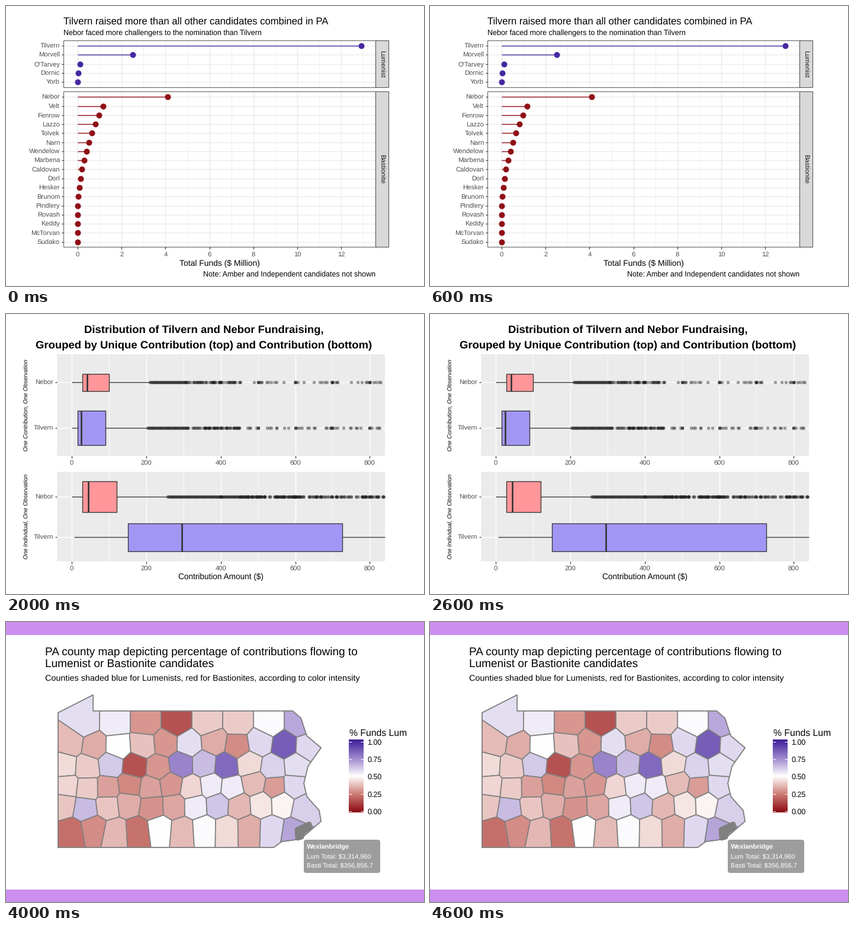
Animation of 706 by 472 pixels, one loop 5 s. Source, as a matplotlib script:

```python
from itertools import count

import matplotlib.pyplot as plt
import numpy as np
from matplotlib.animation import FuncAnimation
from matplotlib.colors import LinearSegmentedColormap
from matplotlib.patches import FancyBboxPatch, Polygon, Rectangle

W, H = 706, 472
PT = 0.72  # points per pixel at 100 dpi
plt.rcParams.update({"font.family": "Liberation Sans", "text.hinting": "none",
                     "text.parse_math": False, "toolbar": "None"})
fig = plt.figure(figsize=(W / 100, H / 100), dpi=100, facecolor="white")
rng = np.random.default_rng(7)
layer = count(1)
scenes = []
GREY, DARK, PANEL = "#4d4d4d", "#333333", "#ebebeb"

LEFT = ["Tilvern", "Morvell", "O'Tarvey", "Dornic", "Yorb"]
RIGHT = ["Nebor", "Velt", "Fenrow", "Lazzo", "Tolvek", "Narn", "Wendelow",
         "Marbena", "Caldovan", "Dorl", "Hesker", "Brunom", "Pindlery",
         "Rovash", "Keddy", "McTorvan", "Sudako"]
A, B = LEFT[0], RIGHT[0]


def scene():
    global ax
    ax = fig.add_axes([0, 0, 1, 1])
    ax.set_xlim(0, W)
    ax.set_ylim(H, 0)
    ax.axis("off")
    scenes.append(ax)


def text(x, y, s, size, color="black", ha="left", **kw):
    kw.setdefault("va", "baseline")
    ax.text(x, y, s, size=size * PT, color=color, ha=ha, zorder=next(layer), **kw)


def label(x, y, s, ha="right", size=11.2, color=GREY):
    text(x, y + 0.36 * size, s, size, color, ha)


def turned(x, y, s, size, color="black", angle=90, **kw):
    text(x, y, s, size, color, "center", va="center", rotation=angle, **kw)


def rect(x0, y0, x1, y1, fill, edge="none", lw=0):
    ax.add_patch(Rectangle((x0, y0), x1 - x0, y1 - y0, fc=fill, ec=edge,
                           lw=lw * PT, zorder=next(layer)))


def line(xs, ys, color, lw=1.4, **kw):
    kw.setdefault("solid_capstyle", "butt")
    ax.plot(xs, ys, color=color, lw=lw * PT, zorder=next(layer), **kw)


def hline(x0, x1, y, color, lw=1.4):
    line([x0, x1], [y, y], color, lw)


def vline(x, y0, y1, color, lw=1.4, **kw):
    line([x, x], [y0, y1], color, lw, **kw)


def dots(xs, ys, color, size, alpha=1):
    ax.plot(xs, ys, "o", color=color, ms=size * PT, mec="none", alpha=alpha,
            zorder=next(layer))


# Lollipop chart

def lollipops(names, values, top, bottom, first, color, strip):
    rect(97, top, 624, bottom, "white")
    for v in range(14):
        vline(121 + 37.1 * v, top, bottom, PANEL, 0.7 if v % 2 else 1.4)
    rows = [first + 15.27 * i for i in range(len(names))]
    for y in rows:
        hline(97, 624, y, PANEL)
    for name, v, y in zip(names, values, rows):
        x = 121 + 37.1 * v
        hline(121, x, y, color)
        dots([x], [y], color, 10)
        hline(93.5, 97, y, DARK, 1.2)
        label(91, y, name)
    rect(97, top, 624, bottom, "none", "#666666", 1.1)
    rect(624, top, 646, bottom, "#d9d9d9", "#555555", 1.1)
    turned(634.5, (top + bottom) / 2, strip, 11.3, "#1a1a1a", 270)


scene()
text(97, 31, f"{A} raised more than all other candidates combined in PA", 16.65)
text(97, 49, f"{B} faced more challengers to the nomination than {A}", 12.5)
lollipops(LEFT, [12.92, 2.5, 0.1, 0.02, 0.01], 58, 137, 67, "#4428a0", "Lumenist")
decay = 1.15 * np.clip(1 - np.arange(16) / 12, 0, 1) ** 2
lollipops(RIGHT, [4.1, *decay], 144, 406, 153.3, "#8f1016", "Bastionite")
for v in range(0, 14, 2):
    x = 121 + 37.1 * v
    vline(x, 406, 409.5, DARK, 1.2)
    label(x, 417.5, str(v), "center")
text(361, 438.5, "Total Funds ($ Million)", 13.95, ha="center")
text(624, 456.5, "Note: Amber and Independent candidates not shown", 12.5, ha="right")

# Waffle chart

SHARES = [(A, 52, "#74d9c9"), (B, 16, "#feffb3"), (LEFT[1], 10, "#c2b7dc"),
          (RIGHT[1], 5, "#ff7468"), (RIGHT[2], 3, "#72aed8"), (RIGHT[4], 3, "#ffb155"),
          (RIGHT[3], 3, "#9de560"), (RIGHT[5], 2, "#fec7e3"), (RIGHT[6], 2, "#d9d9d9"),
          (RIGHT[7], 1, "#cc6fbd"), (RIGHT[9], 1, "#c1efc8"), (RIGHT[8], 1, "#fff465"),
          ("12 Others Combined", 2, "#808080")]

scene()
text(48, 142, "Total Contributions to Candidates in PA", 22.15)
cells = [color for _, n, color in SHARES for _ in range(n)]
for i, color in enumerate(cells):
    x, y = 50.2 + 23.35 * (i // 4), 223 - 23.4 * (i % 4)
    rect(x, y, x + 18.2, y + 18.2, color)
text(351, 259.5, "1 square = $250,000", 12.2, "#111111", "center")
for i, (name, _, color) in enumerate(SHARES):
    x, y = (162, 228.5, 290, 354, 427)[i // 3], 294 + 21.4 * (i % 3)
    rect(x, y - 8, x + 16, y + 8, color)
    label(x + 21.3, y, name, "left", 10.7, "black")

# Box plots


def dollars(v):
    return 111 + 0.6292 * v


def panel(top, bottom, rows):
    rect(86, top, 640, bottom, PANEL)
    for v in range(0, 801, 100):
        vline(dollars(v), top, bottom, "white", 0.7 if v % 200 else 1.4)
    for v in range(0, 801, 200):
        vline(dollars(v), bottom, bottom + 3.5, DARK, 1.2)
        label(dollars(v), bottom + 11, str(v), "center")
    for y, name in zip(rows, (B, A)):
        hline(86, 640, y, "white")
        hline(82.5, 86, y, DARK, 1.2)
        label(80, y, name)


def box(y, half, lo, q1, mid, q3, hi, fill):
    hline(lo, hi, y, DARK, 1.3)
    rect(q1, y - half, q3, y + half, fill, DARK, 1.3)
    vline(mid, y - half, y + half, DARK, 2.6)


def outliers(y, start, dense, mid, n_mid, n_tail):
    """Solid run, thinning middle, sparse tail with clumps at round amounts."""
    clumps = np.r_[np.arange(400, 801, 50), np.tile(np.arange(400, 801, 100), 2)]
    xs = np.r_[np.arange(start, dense, 1.3), rng.uniform(dense, mid, n_mid),
               rng.uniform(mid, 638, n_tail), dollars(clumps)]
    dots(xs, np.full(len(xs), y), "#222222", 5.6, 0.42)


RED, BLUE = "#ff9699", "#a296f5"
scene()
text(334.5, 31.5, f"Distribution of {A} and {B} Fundraising,", 18.5, ha="center",
     weight="bold")
text(334.5, 57, "Grouped by Unique Contribution (top) and Contribution (bottom)", 18.5,
     ha="center", weight="bold")
panel(68, 239, (115, 192))
panel(266, 417, (307.5, 376))
box(115, 14.5, 111, 128.5, 136.5, 174, 243, RED)
box(192, 29, 111, 120.5, 127, 168, 239, BLUE)
box(307.5, 26, 111, 128.5, 139, 187, 273, RED)
box(376, 23.5, 115, 205.5, 297, 567.5, 640, BLUE)
outliers(115, 243, 303, 396, 56, 30)
outliers(192, 239, 304, 396, 60, 32)
outliers(307.5, 273, 394, 508, 110, 75)
turned(34, 154, "One Contribution, One Observation", 9.85, style="italic")
turned(34, 341.5, "One Individual, One Observation", 9.85, style="italic")
text(363, 447.5, "Contribution Amount ($)", 13.6, ha="center")

# Cumulative lines


def funds(v):
    return 402.5 - 25.63 * v


def grow(color, x0, x1, f, name="", dx=0, dy=0):
    """Rising line in small uneven steps, with an end dot if it is named."""
    xs = np.r_[np.arange(x0, x1, 2), x1]
    ys = funds(f(xs) + rng.normal(0, 0.015, len(xs)))
    ys[0], ys[-1] = funds(f(x0)), funds(f(x1))
    line(xs, np.minimum.accumulate(ys), color, solid_joinstyle="round")
    if name:
        dots(xs[-1:], ys[-1:], color, 6.4)
        label(x1 + dx, ys[-1] + dy, name, "left", 13.8, color)


def power(x0, x1, total, p=1.0):
    return lambda x: total * ((x - x0) / (x1 - x0)) ** p


def leader(x):
    return np.interp(x, [81, 160, 188, 281, 355, 453, 529, 570, 592, 632.5],
                     [0, 0.7, 1.42, 1.85, 2.4, 4.4, 6, 8, 9.2, 12.93])


def logistic(x):
    return 2.52 / (1 + np.exp(-0.031 * (x - 394)))


GOLD, OLIVE, VIOLET, PINK = "#d49a14", "#b9a312", "#da66f5", "#ff38c4"
scene()
text(81, 25, f"{A} outraises all by a huge margin in PA", 16.65)
text(81, 46, f"{B}'s growth begins not long before nomination sealed", 12.45)
rect(81, 55, 659, 419, PANEL)
dates = np.arange("2015-05", "2017-02", 2, dtype="M8[M]").astype("M8[D]")
months = 107.5 + 0.949 * (dates - dates[0]).astype(int)
for v in range(14):
    hline(81, 659, funds(v), "white", 0.7 if v % 2 else 1.4)
for x in (months[:-1] + months[1:]) / 2:
    vline(x, 55, 419, "white", 0.7)
for x, date in zip(months[:-1], dates):
    vline(x, 55, 419, "white")
    vline(x, 419, 422.5, DARK, 1.2)
    turned(x + 1, 441, date.item().strftime("%m-%y"), 11.2, GREY)
for v in range(0, 13, 2):
    hline(77.5, 81, funds(v), DARK, 1.2)
    label(75, funds(v), f"${v}")
turned(42.5, 237, "Cumulative Funds Raised (Million $)", 13.95)

for color, x0, x1, total, p in [("#f8864a", 165, 398, 0.86, 1.1), (GOLD, 165, 469, 0.38, 0.6),
                                ("#00bf8f", 300, 462, 0.64, 1.1), ("#b480f5", 223, 443, 0.75, 1),
                                ("#8a95ff", 165, 376, 0.24, 1), ("#00a8f0", 223, 571, 0.15, 0.5),
                                ("#00b8c8", 107, 633, 0.08, 1)]:
    grow(color, x0, x1, power(x0, x1, total, p))
grow(GOLD, 81, 632.5, leader, A, -21.5, -6)
grow(OLIVE, 250, 455, power(250, 455, 1.2, 1.6), RIGHT[1], 5, 1)
grow(VIOLET, 223, 544, logistic, LEFT[1], 4.5, 1.5)
for i, color in enumerate([VIOLET, "#fa62db", PINK]):
    hline(81, 545 + 44 * i, funds(0.07 - 0.035 * i), color)
hline(81, 633, funds(-0.01), PINK, 1.8)
grow(PINK, 490, 632.5, power(490, 632.5, 4.1, 0.9), B, -18, -8.5)
for x in (488.5, 529):
    vline(x, 55, 419, "#999999", 1.6, dashes=(1.2, 2.6), dash_capstyle="butt")
for i, s in enumerate([f"Dates {A},", f"then {B}", "secure party", "nomination"]):
    label(509 + i, 124 + 15.4 * i, s, "center", 10.8, "black")

# County map

shade = LinearSegmentedColormap.from_list(
    "funds", ["#8b0a12", "#cd7d76", "#ffffff", "#9d87cc", "#3d1f98"])


def nearer(poly, p, q):
    """Part of a convex polygon that lies closer to p than to q."""
    d = (poly - (p + q) / 2) @ (q - p)
    out = []
    for a, b, da, db in zip(poly, np.roll(poly, -1, 0), d, np.roll(d, -1)):
        if da <= 0:
            out.append(a)
        if da * db < 0:
            out.append(a + (b - a) * da / (da - db))
    return np.array(out)


def shape(points, fill, edge="#808080", lw=1.7):
    patch = Polygon(points, fc=fill, ec=edge, lw=lw * PT, joinstyle="round",
                    zorder=next(layer))
    return ax.add_patch(patch)


# each row of counties: height, first and last centre, shares from west to east
ROWS = [(170, 132, 496, [.57, .54, .3, .16, .4, .4, .51, .68]),
        (207, 110, 510, [.37, .34, .5, .38, .3, .57, .34, .28, .58, .85, .58]),
        (243, 100, 490, [.43, .4, .61, .16, .3, .76, .64, .82, .43, .59, .57]),
        (277, 103, 488, [.42, .4, .32, .27, .32, .3, .42, .54, .54, .37, .31, .58]),
        (309, 97, 505, [.39, .64, .39, .34, .29, .33, .54, .62, .36, .45, .48, .6]),
        (352, 110, 485, [.22, .28, .36, .23, .5, .37, .51, .43, .34, .58, .69])]
STATE = [(88, 153), (147, 123), (147, 150), (484, 150), (498, 162), (508, 192), (532, 212),
         (510, 243), (503, 272), (508, 294), (529, 318), (532, 336), (497, 366),
         (466, 370), (452, 380), (88, 380)]

scene()
rect(0, 0, W, 22, "#cb90ef")
rect(0, 451, W, H, "#cb90ef")
text(66, 56, "PA county map depicting percentage of contributions flowing to", 19)
text(66, 76, "Lumenist or Bastionite candidates", 19)
text(66, 99.5, "Counties shaded blue for Lumenists, red for Bastionites, "
     "according to color intensity", 14.35)

seeds, shares = [], []
for k, (y, x0, x1, row) in enumerate(ROWS):
    wobble = (2, 5) if k else (0, 0)
    for x, share in zip(np.linspace(x0, x1, len(row)), row):
        seeds.append(np.array([x, y]) + rng.uniform(-1, 1, 2) * wobble)
        shares.append(share)
border = shape(STATE, "none")
for p, share in zip(seeds, shares):
    cell = np.array([(80, 115), (540, 115), (540, 385), (80, 385)], float)
    for q in seeds:
        if q is not p:
            cell = nearer(cell, p, q)
    shape(cell, shade(share)).set_clip_path(border)
shape(STATE, "none")
shape([(493, 364), (492, 350), (512, 341), (513, 346), (501, 354), (499, 362)],
      shade(.9), lw=9)

text(580, 191.5, "% Funds Lum", 15.7)
ax.imshow(np.linspace(1, 0, 123)[:, None], cmap=shade, extent=(579, 604, 321, 198.5),
          aspect="auto", zorder=next(layer))
for i in range(5):
    y = 202 + 29.3 * i
    hline(579, 584, y, "white", 1)
    hline(599, 604, y, "white", 1)
    label(610.5, y, f"{1 - i / 4:.2f}", "left", 12.5, "black")

ax.add_patch(FancyBboxPatch((507, 371), 121, 48, boxstyle="round,pad=4,rounding_size=4",
                            fc="#9d9d9d", ec="none", zorder=next(layer)))
text(508, 383, "Wexlanbridge", 11, "white", weight="bold")
text(508, 398.5, "Lum Total: $3,314,960", 11, "white")
text(508, 414, "Basti Total: $356,856.7", 11, "white")


def show(i):
    for k, view in enumerate(scenes):
        view.set_visible(k == i)
    return scenes


anim = FuncAnimation(fig, show, frames=5, init_func=lambda: show(0), interval=1000,
                     repeat=True, blit=False)
plt.show()
```
